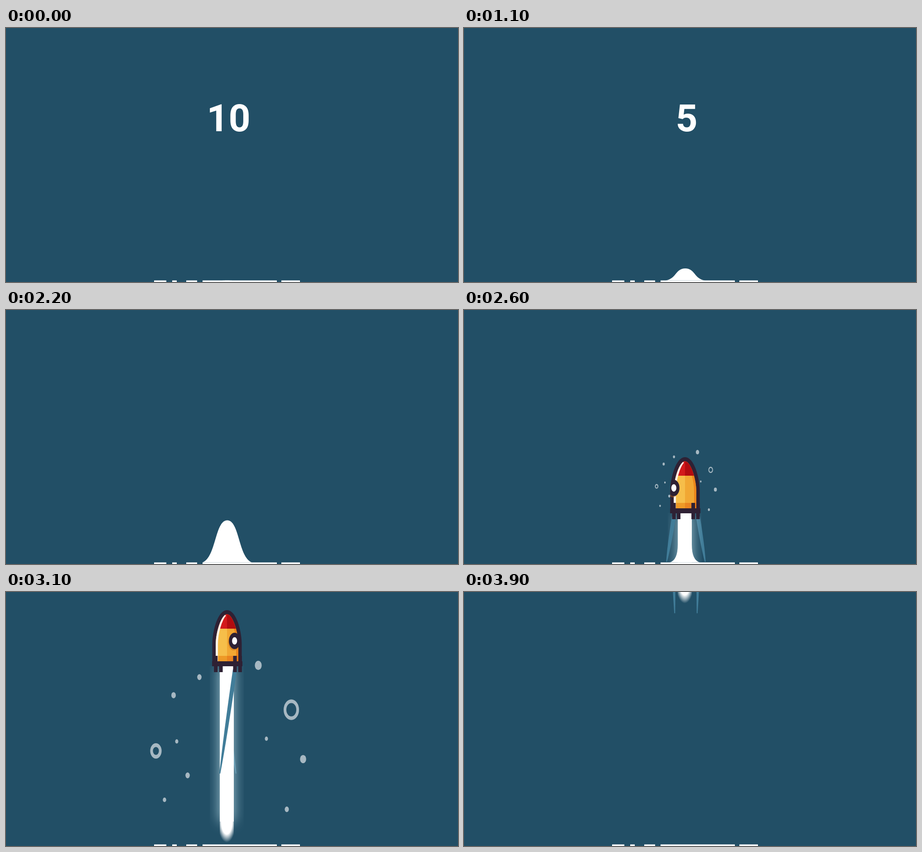
Animation, 998 px wide and 561 px high, one loop 4 s. Source, as an HTML page with a canvas:

```html
<!DOCTYPE html>
<html lang="en">
<head>
<meta charset="utf-8">
<title>Countdown</title>
<style>
  html, body { margin: 0; width: 100%; height: 100%; overflow: hidden; background: #224f66; }
  canvas { display: block; }
</style>
</head>
<body>
<canvas id="stage" width="998" height="561"></canvas>
<script>
const ctx = document.getElementById('stage').getContext('2d');
const LOOP = 4000, STEP = 100, COUNT = 200, LAUNCH = 2500, TURN = 3100;
const GROUND = 557.5, MID = 487.5;
const BG = '#224f66', DARK = '#2e2134', TRAIL = '#417d99';

// x, y and radius once the burst has opened; big ones are rings
const BUBBLES = [
  [557, 162, 7.6], [630, 260, 14], [656, 369, 6.8], [620, 480, 4.6], [575, 324, 3.5], [427, 188, 4.8],
  [370, 228, 5], [377, 330, 3.5], [331, 351, 9.6], [401, 405, 4.8], [350, 459, 3.8]
];
const SEGMENTS = [[327, 354], [367, 377], [398, 422], [434, 598], [608, 649]];

const mix = (a, b, p) => a + (b - a) * p;
const clamp = v => Math.max(0, Math.min(1, v));
const sin = deg => Math.sin(deg * Math.PI / 180);
const cos = deg => Math.cos(deg * Math.PI / 180);

// The rocket brakes until TURN, then speeds up again; its spin slows down.
function pose(t) {
  const u = (t - TURN) / 400;
  const tip = 40 - 93 * u + (u < 0 ? 108 : -42) * u * u;
  return {
    tip,
    base: tip + 123,
    plumeEnd: 552 - 200 * u - 32 * u * u,
    spin: 210 + 56 * u - 12 * u * u,
    lag: 65 + 16 * u - 14 * u * u,
    trail: Math.min(238, 108 + (t - 2600) * 0.28),
    flare: clamp((3000 - t) / 400)
  };
}

function rect(color, x, y, w, h) {
  ctx.fillStyle = color;
  ctx.fillRect(x, y, w, h);
}

function oval(color, x, y, rx, ry) {
  ctx.fillStyle = color;
  ctx.beginPath();
  ctx.ellipse(x, y, rx, ry, 0, 0, 7);
  ctx.fill();
}

function drawGround() {
  for (const [a, b] of SEGMENTS) rect('#fff', a, GROUND, b - a, 4);
}

function drawCount(t) {
  const n = 10 - Math.floor(t / COUNT);
  if (n < 0) return;
  ctx.fillStyle = '#fff';
  ctx.font = '700 84px Roboto, sans-serif';
  ctx.textAlign = 'center';
  ctx.fillText(n, 491.5, 227.5);
}

function drawBump(t) {
  const x = MID + 1, h = 26 * (t / 1100) ** 1.83 + 0.5;
  const w = Math.min(54.5, 16 + t / 40);
  const top = GROUND - h, low = GROUND - h * 0.12;
  ctx.fillStyle = '#fff';
  ctx.beginPath();
  ctx.moveTo(x - w, GROUND);
  ctx.bezierCurveTo(x - w * 0.45, low, x - w * 0.5, top, x, top);
  ctx.bezierCurveTo(x + w * 0.5, top, x + w * 0.45, low, x + w, GROUND);
  ctx.fill();
}

function drawBubbles(t) {
  const p = 1.12 * (1 - Math.exp((2477 - t) / 279));
  ctx.globalAlpha = 0.6 * clamp((3450 - t) / 250);
  ctx.fillStyle = ctx.strokeStyle = '#fff';
  ctx.lineWidth = 6;
  for (const [x, y, r] of BUBBLES) {
    const ring = r > 8, s = p ** (ring ? 1.3 : 0.8);
    ctx.save();
    ctx.translate(mix(488, x, p), mix(415, y, p));
    ctx.scale(s, s * 1.34);
    ctx.beginPath();
    ctx.arc(0, 0, r, 0, 7);
    ring ? ctx.stroke() : ctx.fill();
    ctx.restore();
  }
  ctx.globalAlpha = 1;
}

function drawTrail(p, angle) {
  const reach = mix(31, 43, p.flare);
  const x0 = 490 + 31 * sin(angle), x1 = 490 + reach * sin(angle - p.lag);
  const y0 = p.base + 8, y1 = p.base + p.trail;
  const bx = mix(x0, x1, 0.65), by = mix(y0, y1, 0.65);
  ctx.fillStyle = TRAIL;
  ctx.beginPath();
  ctx.moveTo(x0 - 4.5, y0);
  ctx.lineTo(x0 + 4.5, y0);
  ctx.quadraticCurveTo(bx + 4.5, by, x1 + 1, y1);
  ctx.lineTo(x1 - 1, y1);
  ctx.quadraticCurveTo(bx - 4.5, by, x0 - 4.5, y0);
  ctx.fill();
}

function drawPlume({ base, plumeEnd, flare }) {
  const neck = plumeEnd - 45;
  ctx.save();
  ctx.beginPath();
  ctx.rect(450, base, 75, 900);
  ctx.clip();
  ctx.shadowColor = 'rgba(185,218,230,.85)';
  ctx.shadowBlur = 28;
  rect('#fff', 472, base, 31, neck - base);
  ctx.restore();

  // soft end
  ctx.save();
  ctx.beginPath();
  ctx.rect(472, neck, 31, 50);
  ctx.clip();
  ctx.translate(MID, neck);
  ctx.scale(20, 46);
  const g = ctx.createRadialGradient(0, 0, 0.6, 0, 0, 1);
  g.addColorStop(0, '#fff');
  g.addColorStop(1, 'rgba(255,255,255,0)');
  rect(g, -1, 0, 2, 1);
  ctx.restore();

  const w = 18 * flare;
  ctx.fillStyle = '#fff';
  for (const [x, dx] of [[472, -w], [503, w]]) {
    ctx.beginPath();
    ctx.moveTo(x, 518);
    ctx.quadraticCurveTo(x, 553, x + dx, GROUND);
    ctx.lineTo(x, GROUND);
    ctx.fill();
  }
}

function shell(x0, x1, top, shoulder, bottom, apex) {
  const m = (x0 + x1) / 2, w = (x1 - x0) / 2;
  const bend = mix(top, shoulder, 0.6);
  ctx.beginPath();
  ctx.moveTo(x0, bottom);
  ctx.lineTo(x0, shoulder);
  ctx.bezierCurveTo(x0, bend, m - w * apex, top, m, top);
  ctx.bezierCurveTo(m + w * apex, top, x1, bend, x1, shoulder);
  ctx.lineTo(x1, bottom);
  ctx.closePath();
}

const hull = () => shell(455.5, 520.5, 0, 76, 123, 0.62);

function halves(left, right, y, h) {
  rect(left, 463, y, 25, h);
  rect(right, 488, y, 25, h);
}

function rim(color, x, lean) {
  ctx.strokeStyle = color;
  ctx.beginPath();
  ctx.moveTo(x, 114);
  ctx.lineTo(x, 76);
  ctx.bezierCurveTo(x, 50, x + lean * 9, 20, x + lean * 19, 9);
  ctx.stroke();
}

function drawBody() {
  hull();
  ctx.fillStyle = DARK;
  ctx.fill();
  ctx.save();
  shell(463, 513, 9, 76, 114, 0.5);
  ctx.clip();
  ctx.lineWidth = 10;
  halves('#f6be4a', '#f1a733', 0, 114);
  halves('#ee9a27', '#ea8420', 101, 13);
  rim('rgba(232,112,12,.6)', 513, -1);
  halves('#d31a1b', '#b20c10', 0, 41);
  rim('#fdf3e8', 463, 1);
  ctx.restore();
}

function drawWindow(angle) {
  if (cos(angle) < 0) return;
  const x = MID + 30 * sin(angle);
  ctx.save();
  hull();
  ctx.clip();
  oval('rgba(190,100,20,.45)', x - 2, 71, 12, 18);
  oval(DARK, x, 68, 12.5, 18);
  oval('#fff', x, 68, 5.6, 8.3);
  ctx.restore();
}

function drawRocket({ tip, spin }) {
  const legs = [0, 90, 180, 270].map(k => spin + k);
  const leg = a => rect(DARK, 486 + 31 * sin(a), 101, 8, 36);
  ctx.save();
  ctx.translate(0, tip);
  legs.filter(a => cos(a) < 0).forEach(leg);
  drawBody();
  drawWindow(spin - 175);
  rect(DARK, 455, 113, 67, 11);
  legs.filter(a => cos(a) >= 0).forEach(leg);
  ctx.restore();
}

function drawLaunch(t) {
  const p = pose(t), trails = [p.spin, p.spin + 180];
  const inFront = a => cos(a - p.lag / 2) > 0;
  ctx.save();
  ctx.beginPath();
  ctx.rect(0, 0, 998, GROUND);
  ctx.clip();
  drawBubbles(t);
  trails.filter(a => !inFront(a)).forEach(a => drawTrail(p, a));
  drawPlume(p);
  trails.filter(inFront).forEach(a => drawTrail(p, a));
  drawRocket(p);
  ctx.restore();
}

function draw(t) {
  rect(BG, 0, 0, 998, 561);
  if (t < LAUNCH) {
    drawBump(t);
    drawCount(t);
  } else {
    drawLaunch(t);
  }
  drawGround();
}

const start = performance.now();
function tick() {
  const t = (performance.now() - start) % LOOP;
  draw(Math.floor(t / STEP) * STEP);
  requestAnimationFrame(tick);
}
tick();
</script>
</body>
</html>
```
